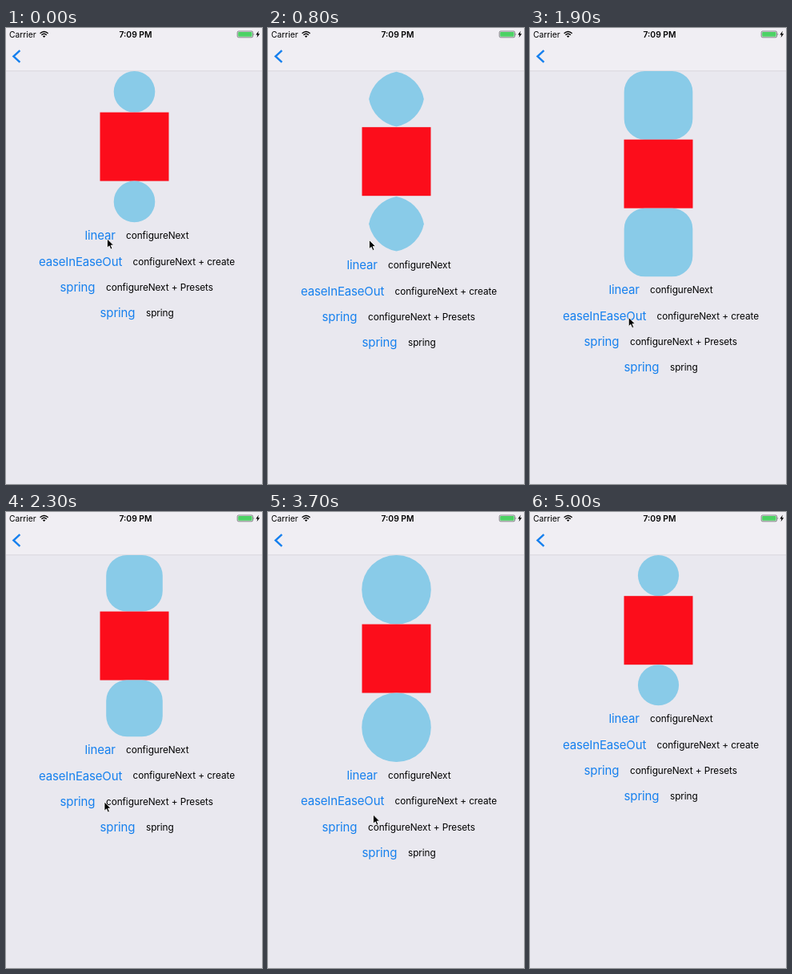
Recreate the animation shown at these times as an HTML page. Size 320x571 px, loop 5100 ms.

```html
<!DOCTYPE html>
<html lang="en">
<head>
<meta charset="utf-8">
<title>Layout animation</title>
<style>
  html, body { margin: 0; width: 100%; height: 100%; overflow: hidden; background: #e9e8ef; }
  svg { display: block; width: 320px; height: 571px; font-family: Inter, sans-serif; }
  .status { font-size: 10.3px; }
  .button { font-size: 15px; letter-spacing: -.16px; fill: #1680ee; }
  .label { font-size: 11.8px; letter-spacing: -.07px; fill: #000; }
</style>
</head>
<body>
<svg viewBox="0 0 320 571">
  <rect width="320" height="571" fill="#e9e8ef"/>
  <rect width="320" height="54" fill="#f0eef3"/>
  <rect y="53.5" width="320" height=".7" fill="#cfced4"/>

  <g class="status">
    <text x="4" y="11.8">Carrier</text>
    <text x="162" y="11.8" text-anchor="middle" font-weight="600">7:09 PM</text>
  </g>
  <g fill="none" stroke="#000" stroke-width="1.4">
    <path d="M42.6 6.7Q47.6 2.1 52.6 6.7"/>
    <path d="M44.4 8.8Q47.6 5.9 50.8 8.8"/>
  </g>
  <path d="M45.8 10.1Q47.6 8.7 49.4 10.1L47.6 12Z"/>
  <rect x="289.2" y="4" width="19.4" height="7.8" rx="1.6" fill="none" stroke="#55555a" stroke-width=".7"/>
  <rect x="290.2" y="5" width="17.4" height="5.8" rx=".8" fill="#4cd264"/>
  <path d="M309.6 6.5Q311 7.9 309.6 9.3Z" fill="#55555a"/>
  <path d="M315.8 3.8L312.3 8.5H314.4L313.6 12L317.2 7.2H315Z"/>
  <path d="M17.4 28.2L9.4 35.5L17.4 42.8" fill="none" stroke="#1680ee" stroke-width="2.4"/>

  <path id="top" fill="#89cbe8"/>
  <rect id="square" x="117.5" width="86" height="86" fill="#fc0d1b"/>
  <path id="bottom" fill="#89cbe8"/>

  <g id="rows">
    <text class="button" x="98.5" y="265.3">linear</text>
    <text class="label" x="150" y="264.2">configureNext</text>
    <text class="button" x="41" y="297.6">easeInEaseOut</text>
    <text class="label" x="158.5" y="296.5">configureNext + create</text>
    <text class="button" x="67.6" y="329.8">spring</text>
    <text class="label" x="125" y="328.7">configureNext + Presets</text>
    <text class="button" x="117.6" y="362">spring</text>
    <text class="label" x="175" y="360.9">spring</text>
  </g>

  <path id="cursor" d="M0 0V11.2L2.6 8.8L4.4 13L6.4 12.2L4.6 8.1H8Z" stroke="#fff" stroke-width=".8"/>
</svg>
<script>
const LOOP = 5100, STEP = 100;
const SMALL = 51.6, BIG = 86, TOP = 54, MID = 160.5;
const el = id => document.getElementById(id);
const top1 = el('top'), square = el('square'), bottom = el('bottom');
const rows = el('rows'), cursor = el('cursor');
const clamp = v => Math.max(0, Math.min(1, v));
const mix = (a, b, p) => a + (b - a) * p;

const linear = ms => clamp(ms / 1000);

// cubic-bezier(.42, 0, .58, 1) over one second
function easeInOut(ms) {
  const x = clamp(ms / 1000);
  let lo = 0, hi = 1;
  for (let i = 0; i < 24; i++) {
    const s = (lo + hi) / 2, q = 1 - s;
    if (3 * q * q * s * .42 + 3 * q * s * s * .58 + s * s * s < x) lo = s; else hi = s;
  }
  return lo * lo * (3 - 2 * lo);
}

// Damping ratio .4, settled after 700 ms
function spring(ms) {
  const t = ms / 1000, damp = 9.86, w = 22.6;
  return 1 - Math.exp(-damp * t) * (Math.cos(w * t) + damp / w * Math.sin(w * t));
}

const moves = [
  { at: 260, from: SMALL, to: BIG, ease: linear },
  { at: 1830, from: BIG, to: SMALL, ease: easeInOut },
  { at: 3270, from: SMALL, to: BIG, ease: spring },
  { at: 4550, from: BIG, to: SMALL, ease: spring }
];

// time, x, y of the pointer tip
const track = [
  [0, 126.5, 264], [800, 126.5, 265.5], [1050, 126.5, 267], [1300, 127, 343],
  [1600, 123.5, 362], [2300, 123, 363], [2400, 122, 360], [2800, 103, 322],
  [2900, 102.5, 321], [3300, 103, 322], [3700, 131.5, 379], [4100, 139, 427], [4800, 139, 427]
];

function pointer(t) {
  const i = Math.max(1, track.findIndex(k => k[0] >= t));
  const a = track[i - 1], b = track[i], p = clamp((t - a[0]) / (b[0] - a[0]));
  return [mix(a[1], b[1], p), mix(a[2], b[2], p)];
}

// Corners wider than half the box meet in points
function blob(y, d, r) {
  const h = d / 2, k = r - h, arc = `A${r} ${r} 0 0 1 `;
  const cy = y + h, at = (dx, dy) => `${MID + dx} ${cy + dy}`;
  const m = k > 0 ? Math.sqrt(r * r - k * k) - k : h;
  const f = Math.max(0, -k);
  return `M${at(-m, -f)}${arc}${at(-f, -m)}L${at(f, -m)}${arc}${at(m, -f)}` +
    `L${at(m, f)}${arc}${at(f, m)}L${at(-f, m)}${arc}${at(-m, f)}Z`;
}

function draw(t) {
  const move = moves.filter(m => m.at <= t).pop();
  const d = move ? mix(move.from, move.to, move.ease(t - move.at)) : SMALL;
  const r = (move ? move.to : SMALL) / 2;
  top1.setAttribute('d', blob(TOP, d, r));
  square.setAttribute('y', TOP + d);
  bottom.setAttribute('d', blob(TOP + d + 86, d, r));
  rows.setAttribute('transform', `translate(0 ${2 * (d - SMALL)})`);

  const shown = t < 4800;
  cursor.setAttribute('visibility', shown ? 'visible' : 'hidden');
  if (shown) cursor.setAttribute('transform', `translate(${pointer(t)})`);
}

function tick() {
  draw(Math.floor(performance.now() % LOOP / STEP) * STEP);
  requestAnimationFrame(tick);
}
tick();
</script>
</body>
</html>
```
